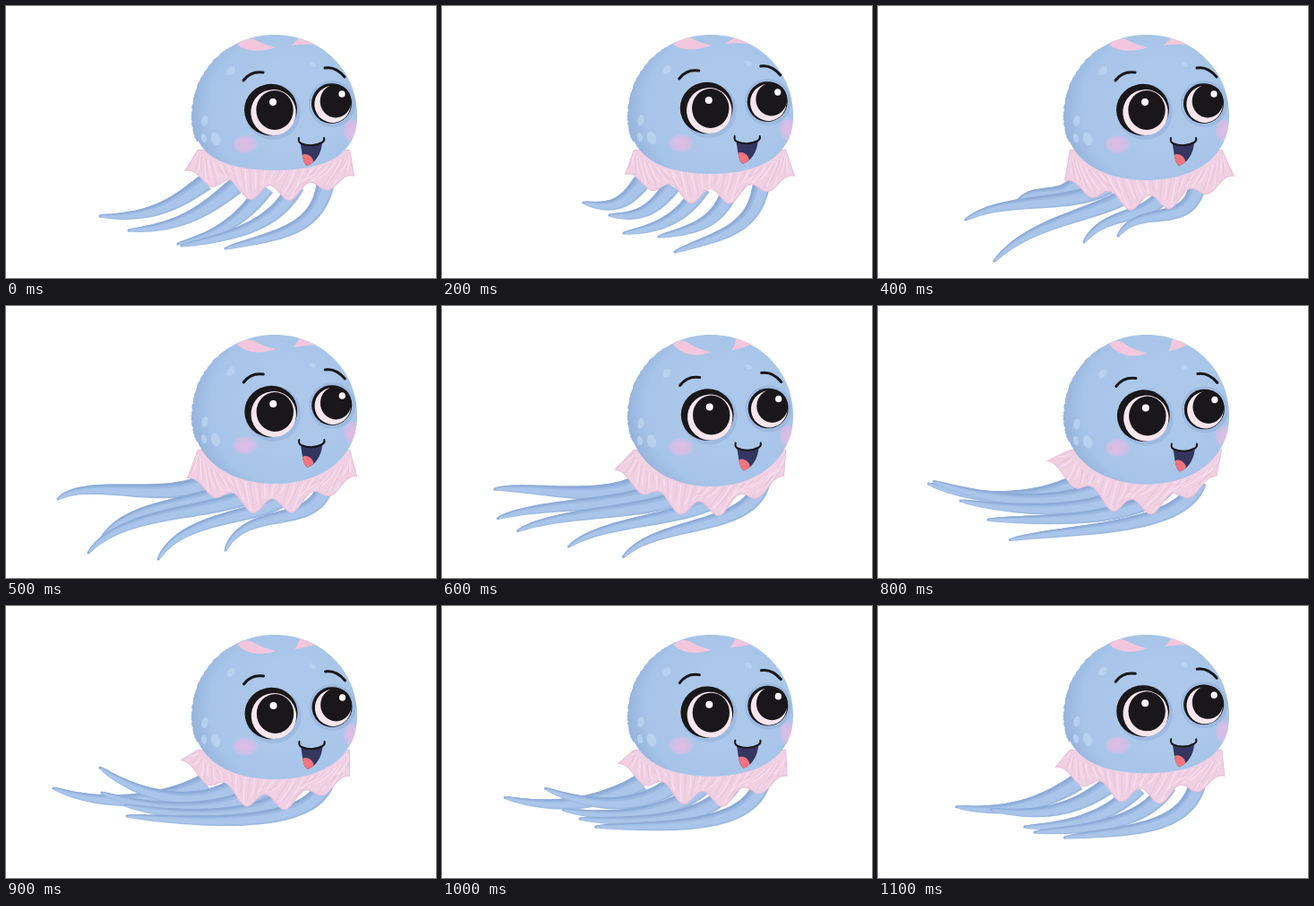
Recreate the animation shown at these times as an HTML page with a canvas. Size 480 px wide and 303 px high, loop 1.2 s.

```html
<!DOCTYPE html>
<html lang="en">
<head>
<meta charset="utf-8">
<title>Jellyfish</title>
<style>
html, body { margin: 0; width: 100%; height: 100%; overflow: hidden; background: #fff; }
canvas { display: block; width: 480px; height: 303px; }
</style>
</head>
<body>
<canvas id="stage"></canvas>
<script>
const W = 480, H = 303, STEP = 100, STEPS = 12;
const canvas = document.getElementById('stage');
const ctx = canvas.getContext('2d');
const dpr = window.devicePixelRatio || 1;
canvas.width = W * dpr;
canvas.height = H * dpr;

const { PI, sin, cos, hypot } = Math;
const TAU = PI * 2;
const INK = '#191719';
const ARMS = 5, ARM_WIDTH = 17;

// face: vertical shift; belly: lowest y of the bell; hemX, hemY: left corner of the frill
// reach, sag: where the far bend of each arm lies; tips: x, y of each arm's end
const poses = [
  { step: 0, face: 0, belly: 183, hemX: 199, hemY: 184, reach: 0.5, sag: 22,
    tips: [105, 234, 137, 250, 192, 265, 196, 267, 245, 270] },
  { step: 2, face: -2, belly: 187, hemX: 204, hemY: 188, reach: 0.5, sag: 20,
    tips: [158, 219, 187, 233, 203, 253, 242, 257, 260, 274] },
  { step: 4, face: 0, belly: 194, hemX: 208, hemY: 195, reach: 0.72, sag: -8,
    tips: [155, 219, 98, 238, 130, 284, 230, 263, 268, 256] },
  { step: 5, face: 2, belly: 198, hemX: 202, hemY: 192, reach: 0.8, sag: -15,
    tips: [58, 215, 105, 262, 92, 275, 170, 282, 245, 272] },
  { step: 7, face: 9, belly: 204, hemX: 182, hemY: 173, reach: 0.7, sag: 14,
    tips: [60, 193, 20, 211, 77, 226, 113, 254, 160, 287] },
  { step: 9, face: 4, belly: 193, hemX: 194, hemY: 172, reach: 0.7, sag: 24,
    tips: [53, 203, 105, 180, 107, 208, 133, 222, 135, 234] }
];
poses.push({ ...poses[0], step: STEPS });

const lerp = (a, b, t) => a + (b - a) * t;

function poseAt(step) {
  const i = poses.findIndex(p => p.step > step);
  const a = poses[i - 1], b = poses[i];
  const t = (step - a.step) / (b.step - a.step);
  const pose = {};
  for (const key in a) {
    pose[key] = key === 'tips' ? a.tips.map((v, k) => lerp(v, b.tips[k], t)) : lerp(a[key], b[key], t);
  }
  return pose;
}

function seeded(seed) {
  return () => (seed = seed * 16807 % 2147483647) / 2147483647;
}

function polygon(points) {
  const path = new Path2D();
  points.forEach(([x, y]) => path.lineTo(x, y));
  path.closePath();
  return path;
}

function fill(path, color) {
  ctx.fillStyle = color;
  ctx.fill(path);
}

function stroke(path, color, width) {
  ctx.strokeStyle = color;
  ctx.lineWidth = width;
  ctx.stroke(path);
}

function oval(x, y, rx, ry, color, turn = 0) {
  const path = new Path2D();
  path.ellipse(x, y, rx, ry, turn, 0, TAU);
  fill(path, color);
}

function blush(x, y, rx, ry) {
  ctx.save();
  ctx.translate(x, y);
  ctx.scale(rx, ry);
  const g = ctx.createRadialGradient(0, 0, 0.3, 0, 0, 1);
  g.addColorStop(0, 'rgba(224,188,228,.9)');
  g.addColorStop(0.65, 'rgba(218,188,230,.7)');
  g.addColorStop(1, 'rgba(210,190,232,0)');
  oval(0, 0, 1, 1, g);
  ctx.restore();
}

// Each arm drops out of the frill, then trails off to its tip.
function armCurve(i, { tips, reach, sag }) {
  const root = [223 + 33.5 * i, 196 + 6 * sin(PI * i / 4)];
  const tip = [tips[i * 2], tips[i * 2 + 1]];
  const dx = tip[0] - root[0], dy = tip[1] - root[1];
  const near = [root[0] + dx * (0.28 - 0.0125 * i * i), root[1] + 24 + 2 * i * i];
  const far = [root[0] + dx * reach, root[1] + dy / 2 + sag];
  return t => {
    const u = 1 - t;
    return [0, 1].map(d => u * u * u * root[d] + 3 * u * u * t * near[d] + 3 * u * t * t * far[d] + t * t * t * tip[d]);
  };
}

function armBand(curve, from, to) {
  const upper = [], lower = [], n = 28;
  for (let i = 0; i <= n; i++) {
    const t = i / n;
    const [x, y] = curve(t), [x0, y0] = curve(t - 0.01), [x1, y1] = curve(t + 0.01);
    const half = ARM_WIDTH / 2 * Math.pow(1 - t, 0.65) + 1.4;
    const k = half / (hypot(x1 - x0, y1 - y0) || 1);
    const nx = (y0 - y1) * k, ny = (x1 - x0) * k;
    upper.push([x - nx * from, y - ny * from]);
    lower.unshift([x - nx * to, y - ny * to]);
  }
  return polygon(upper.concat(lower));
}

function drawArm(curve) {
  fill(armBand(curve, -1, 1), '#9bb9e1');
  fill(armBand(curve, -0.35, 0.75), '#a9c5e9');
  fill(armBand(curve, -1, -0.65), '#8dabd7');
  oval(...curve(1), 1.6, 1.6, '#93b0da');
}

function drawFrill({ belly, hemX, hemY }) {
  const endY = 190, drop = belly + 26 - (hemY + endY) / 2;
  const hem = u => {
    const arch = sin(PI * u);
    const ripple = 9 * Math.sqrt(arch) * cos(TAU * (u - 0.15) / 0.235);
    return [hemX + 190 * u, lerp(hemY, endY, u) + drop * arch + ripple];
  };
  const waist = u => [300 - 86 * cos(PI * u), lerp(160, belly, sin(PI * u))];

  const edge = [], n = 80;
  for (let i = 0; i <= n; i++) edge.push(hem(i / n));
  const path = polygon([[214, 160], ...edge, [384, 160]]);
  fill(path, '#f0d0e3');
  ctx.save();
  ctx.clip(path);
  for (let i = 0; i <= 48; i++) {
    const [tx, ty] = waist(i / 48), [x, y] = hem(i / 48);
    const fold = new Path2D();
    fold.moveTo(tx, ty);
    fold.quadraticCurveTo((tx + x) / 2 + 2 * sin(i * 2.3), (ty + y) / 2, x, y - 2 - 4 * (i % 3));
    stroke(fold, i % 2 ? 'rgba(225,184,213,.45)' : 'rgba(252,233,242,.6)', 1.3);
  }
  stroke(path, 'rgba(236,184,211,.8)', 1.8);
  ctx.restore();
}

function bellPath(belly) {
  const path = new Path2D();
  path.moveTo(208, 122);
  path.bezierCurveTo(208, 72, 248, 32, 300, 32);
  path.bezierCurveTo(352, 32, 392, 72, 392, 122);
  path.bezierCurveTo(392, 168, 354, belly, 300, belly);
  path.bezierCurveTo(246, belly, 208, 168, 208, 122);
  return path;
}

function drawBell({ belly, face }) {
  // Brushy rim on the shaded side.
  const rnd = seeded(7);
  for (let i = 0; i < 60; i++) {
    const a = PI * (0.9 + 0.42 * i / 60);
    oval(300 + 91 * cos(a), 122 + 89 * sin(a), 1 + 1.6 * rnd(), 1.2 + rnd(), '#98b5dc');
  }

  const path = bellPath(belly);
  const g = ctx.createRadialGradient(322, 110, 45, 312, 114, 106);
  g.addColorStop(0, '#abc8ea');
  g.addColorStop(0.7, '#a6c4e8');
  g.addColorStop(1, '#96b3db');
  fill(path, g);
  ctx.save();
  ctx.clip(path);

  const y = face + 1, pink = '#f3c6dd';
  fill(new Path2D(`M258 43Q268 35 277 ${36 + y}Q287 ${42 + y} 301 ${45 + y}Q274 ${54 + y} 258 43Z`), pink);
  fill(new Path2D(`M${317 + y} ${43 + y}Q328 ${36 + y} 329 30L346 43Q334 ${41 + y} ${317 + y} ${43 + y}Z`), pink);

  const s = face / 2, pale = 'rgba(190,214,242,.75)';
  oval(222, 128 + s, 3.5, 6, pale, 0.2);
  oval(234, 148 + s, 5, 7.5, pale, -0.3);
  oval(221, 147 + s, 3, 5, pale, -0.2);
  oval(251, 72 + s, 4, 5.5, pale, 0.7);
  oval(342, 65 + s, 4, 2.5, pale, 0.5);

  blush(267, 154 + face * 0.6, 15, 11);
  blush(386, 139 + face, 10, 14);
  ctx.restore();
}

function drawEye(x, y, rx, ry, lid, pupilX, pupilY, size) {
  oval(x, y, rx + 4, ry + 4, 'rgba(137,166,211,.4)');
  oval(x - lid / 2, y - lid / 2, rx + lid / 2, ry + lid / 3, INK, -0.2);
  oval(x + 0.5, y + 0.5, rx - 1.8, ry - 1.5, '#f9e6ec', -0.1);
  oval(pupilX, pupilY, size * 0.94, size, INK);
}

function drawFace({ face }) {
  ctx.save();
  ctx.translate(face / 8, face);
  ctx.lineCap = ctx.lineJoin = 'round';

  drawEye(298, 118, 27, 27, 5, 300, 116, 22);
  oval(298, 107, 4, 4, '#fff');
  drawEye(364, 109, 22, 22, 1, 368, 106, 18.5);
  oval(375, 98, 3.6, 3.8, '#fff');

  stroke(new Path2D('M265 83Q273 72 287 74'), INK, 3);
  stroke(new Path2D('M356 69Q368 67 378 79'), INK, 3);

  const mouth = new Path2D('M328 151C336 157 347 156 353 152C352 165 345 175 336 178C330 174 331 161 328 151Z');
  fill(mouth, '#34365f');
  ctx.save();
  ctx.clip(mouth);
  oval(334, 174, 9, 9, '#f3747e', -0.4);
  ctx.restore();
  stroke(new Path2D('M327 147Q326 151 329 153Q342 158 353 152Q356 150 355 147'), INK, 2);
  ctx.restore();
}

function draw(step) {
  const pose = poseAt(step);
  ctx.setTransform(dpr, 0, 0, dpr, 0, 0);
  ctx.fillStyle = '#fff';
  ctx.fillRect(0, 0, W, H);
  for (let i = 0; i < ARMS; i++) drawArm(armCurve(i, pose));
  drawFrill(pose);
  drawBell(pose);
  drawFace(pose);
}

const start = performance.now();
function tick() {
  draw(Math.floor((performance.now() - start) / STEP) % STEPS);
  requestAnimationFrame(tick);
}
tick();
</script>
</body>
</html>
```
